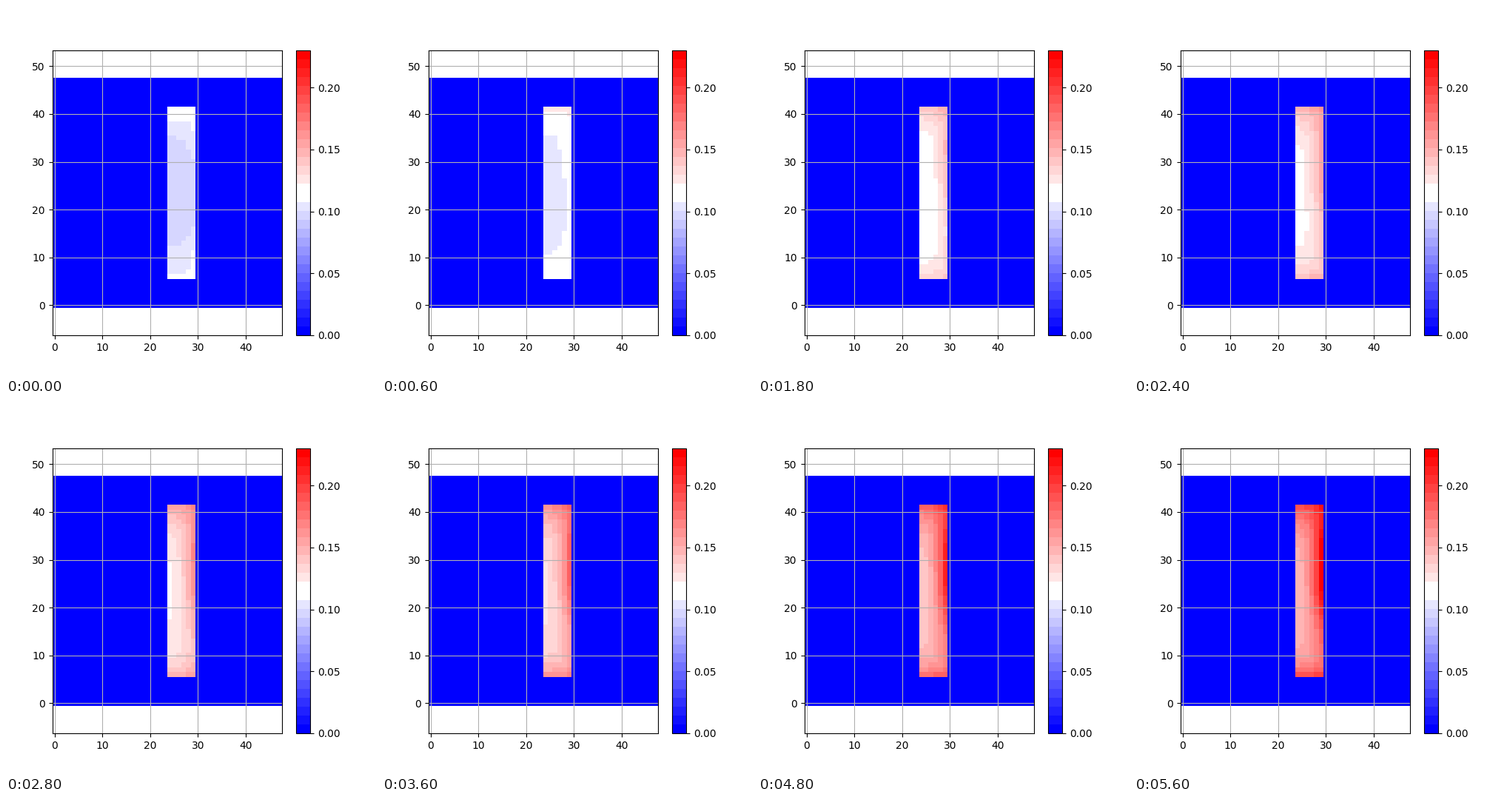
Recreate the animation shown at these times as a matplotlib script. Size 500 by 500 pixels, loop 5800 ms.

```python
import numpy as np
import matplotlib.pyplot as plt
from matplotlib.animation import FuncAnimation
from matplotlib.colors import ListedColormap

STEPS, INTERVAL = 29, 200
SIZE, LEVELS, VMAX = 48, 32, 0.23
ROWS, COLS = slice(6, 42), slice(24, 30)

y = np.arange(ROWS.start, ROWS.stop)[:, None]
u = np.linspace(0, 1, COLS.stop - COLS.start)


def ends(top, top_len, bottom, bottom_len):
    """Rise towards both ends of the bar, fading over the given lengths."""
    return (top * np.exp((y - 41) / top_len)
            + bottom * np.exp((6 - y) / bottom_len))


def bump(distance, width):
    return np.exp(-(distance / width) ** 2)


# Starting level and its steady growth per step, both higher on the right side.
start = (0.095 + ends(0.020, 4.5, 0.0133, 7.6)
         + 0.007 * u ** 4 * bump(abs(y - 22.5) - 11.5, 4.5))
rate = (0.0017 + ends(0.0010, 5, 0.0012, 2)
        + 0.0030 * u ** 2 * bump(y - 27, 13))


def field(step):
    grid = np.zeros((SIZE, SIZE))
    grid[ROWS, COLS] = start + rate * step
    return grid


colors = plt.get_cmap("bwr")(np.linspace(0, 1, LEVELS))
colors[LEVELS // 2 - 1:LEVELS // 2 + 1] = 1

fig, ax = plt.subplots(figsize=(5, 5), dpi=100)
edges = np.arange(SIZE + 1) - 0.5
mesh = ax.pcolormesh(edges, edges, field(0), cmap=ListedColormap(colors),
                     vmin=0, vmax=VMAX)
fig.colorbar(mesh, ax=ax)

# Equal scale on both axes, centred on the grid.
box = ax.get_window_extent()
mid, half = (SIZE - 1) / 2, SIZE / 2 * box.height / box.width
ax.set_xlim(edges[0], edges[-1])
ax.set_ylim(mid - half, mid + half)
ax.set_xticks(range(0, SIZE, 10))
ax.set_yticks(range(0, 51, 10))
ax.grid(True)


def update(step):
    mesh.set_array(field(step))
    return [mesh]


anim = FuncAnimation(fig, update, frames=STEPS, interval=INTERVAL,
                     repeat=True, repeat_delay=0, blit=False)
plt.show()
```
